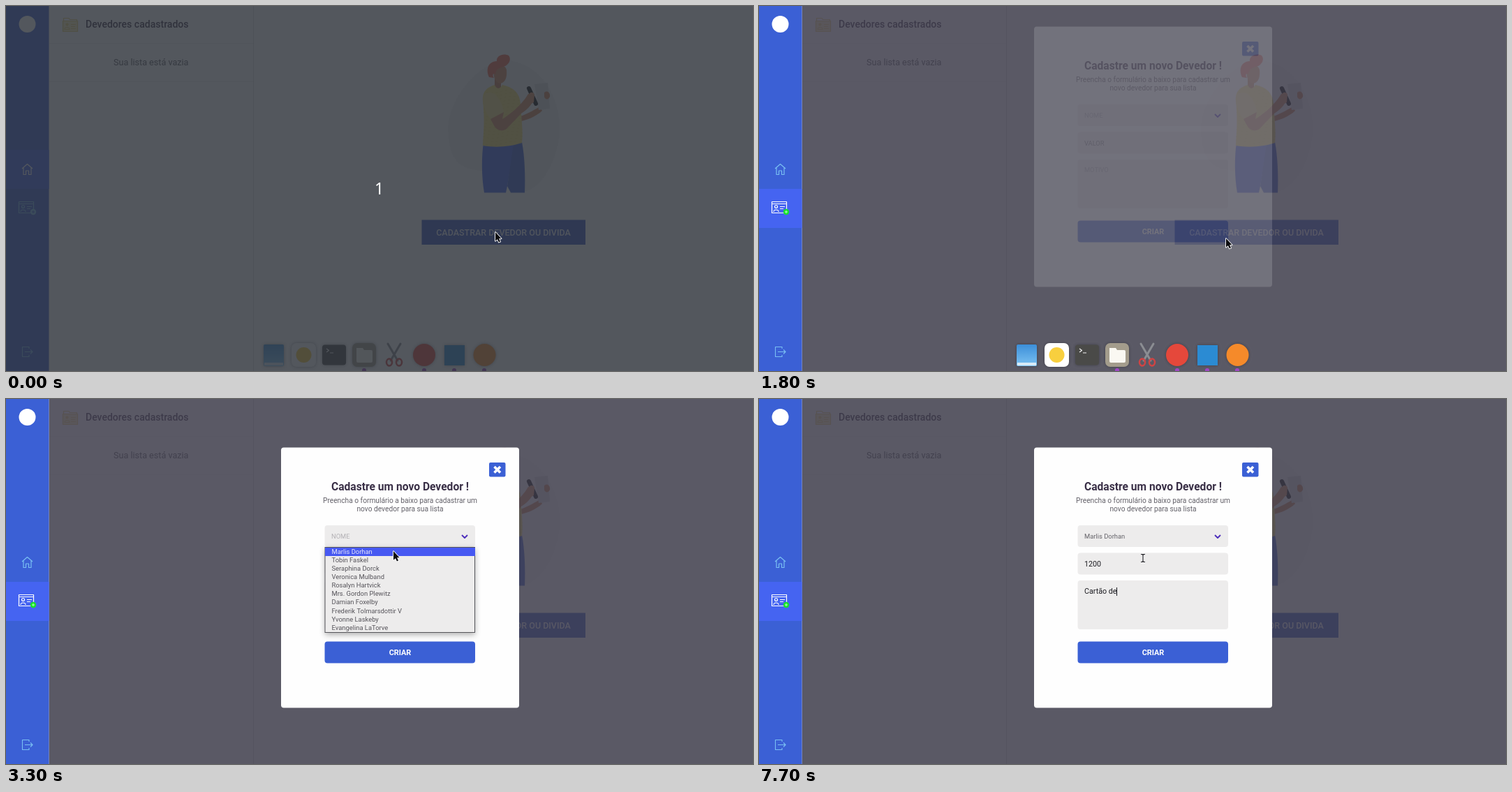
Write an HTML page with a canvas that moves like this. It is 1070 px wide and 523 px high and loops after 8 s.

```html
<!DOCTYPE html>
<html lang="pt-BR">
<head>
<meta charset="utf-8">
<title>Devedores cadastrados</title>
<style>
html, body { margin: 0; width: 100%; height: 100%; overflow: hidden; background: #fefefe; }
canvas { display: block; }
</style>
</head>
<body>
<canvas id="stage" width="1070" height="523"></canvas>
<script>
const W = 1070, H = 523, LOOP = 8000, STEP = 100;
const BLUE = '#3b60d5', ACTIVE = '#4564f1', SKY = '#79bff2';
const NAMES = ['Marlis Dorhan', 'Tobin Faskel', 'Seraphina Dorck', 'Veronica Mulband',
  'Rosalyn Hartvick', 'Mrs. Gordon Plewitz', 'Damian Foxelby', 'Frederik Tolmarsdottir V',
  'Yvonne Laskeby', 'Evangelina LaTorve'];

const stage = document.getElementById('stage').getContext('2d');
const layer = Object.assign(document.createElement('canvas'), { width: W, height: H });
const layerCtx = layer.getContext('2d');
let ctx = stage;

// pointer path: time, x, y
const PATH = [[0, 701, 325], [800, 701, 325], [1000, 498, 247], [1100, 498, 247],
  [1500, 660, 340], [1600, 671, 334], [1700, 671, 334], [1800, 669, 334], [2100, 595, 280],
  [2600, 557, 215], [3100, 553, 202], [3200, 553, 202], [3300, 555, 219], [3600, 552, 222],
  [4000, 550, 228]];
const AMOUNT = [[4900, '1'], [5100, '12'], [5200, '120'], [5400, '1200']];
const REASON = [[6200, 'C'], [6600, 'Ca'], [6700, 'Car'], [6900, 'Cart'], [7200, 'Cartã'],
  [7300, 'Cartão'], [7400, 'Cartão '], [7700, 'Cartão de']];

const typed = (keys, t) => keys.reduce((s, [at, v]) => t >= at ? v : s, '');

function rect(x, y, w, h, color, r = 0) {
  ctx.fillStyle = color;
  ctx.beginPath();
  ctx.roundRect(x, y, w, h, r);
  ctx.fill();
}

function disc(x, y, r, color) {
  ctx.fillStyle = color;
  ctx.beginPath();
  ctx.arc(x, y, r, 0, 7);
  ctx.fill();
}

function shape(d, color) {
  ctx.fillStyle = color;
  ctx.fill(new Path2D(d));
}

function line(d, color, width = 1, cap = 'butt') {
  ctx.strokeStyle = color;
  ctx.lineWidth = width;
  ctx.lineCap = cap;
  ctx.lineJoin = 'round';
  ctx.stroke(new Path2D(d));
}

// cy is the middle of the capitals
function text(s, x, cy, size, color, weight = 400, align = 'left', family = 'Roboto') {
  ctx.font = `${weight} ${size}px ${family}, sans-serif`;
  ctx.fillStyle = color;
  ctx.textAlign = align;
  ctx.fillText(s, x, cy + size * 0.355);
  return ctx.measureText(s).width;
}

// CSS "ease"
function ease(x) {
  if (x <= 0 || x >= 1) return x <= 0 ? 0 : 1;
  const bez = (s, a, b) => 3 * (1 - s) ** 2 * s * a + 3 * (1 - s) * s * s * b + s ** 3;
  let lo = 0, hi = 1;
  for (let i = 0; i < 20; i++) {
    const mid = (lo + hi) / 2;
    if (bez(mid, 0.25, 0.25) < x) lo = mid; else hi = mid;
  }
  return bez(lo, 0.1, 1);
}

function pointerAt(t) {
  const i = PATH.findIndex(k => k[0] > t);
  if (i < 0) return PATH[PATH.length - 1].slice(1);
  const [t0, x0, y0] = PATH[i - 1], [t1, x1, y1] = PATH[i];
  const p = (t - t0) / (t1 - t0);
  return [x0 + (x1 - x0) * p, y0 + (y1 - y0) * p];
}

function sidebar(adding) {
  rect(0, 0, 61.5, H, BLUE);
  rect(0, adding ? 262 : 206, 61.5, 56, ACTIVE);
  disc(30.5, 26, 12, '#fff');
  line('M23 233L30.500 226.500L38 233M25 232V241.500H28.500V236H32.500V241.500H36V232',
    adding ? SKY : '#fff', 1.2);
  const c = adding ? '#fff' : SKY;
  line('M18.500 280.500H39.500V296.500H18.500ZM18.500 283.500H39.500M30 287.500H37M30 290.500H35M21 295C21 291 28 291 28 295', c, 1.2);
  line('M26.500 287.500A2 2 0 1 1 22.500 287.500A2 2 0 1 1 26.500 287.500', c, 1.2);
  disc(39, 295, 4.2, adding ? '#19e32c' : SKY);
  line('M37 295H41M39 293V297', adding ? '#b6ffb9' : BLUE, 1);
  line('M33 491V488.500H23.500V502.500H33V500M27 495.500H38M35 492.500L38 495.500L35 498.500', SKY, 1.1);
}

function shirt() {
  const body = 'M683 200C684 180 686 165 683 135C682 122 690 116 700 113C703 120 708 119 711 113C727 116 736 125 737 140C738 160 741 180 739 196C722 202 700 203 683 200Z';
  shape(body, '#f5df6e');
  ctx.save();
  ctx.clip(new Path2D(body));
  ctx.setLineDash([3, 4]);
  for (let y = 122; y < 200; y += 5) {
    ctx.lineDashOffset = y * 3;
    line(`M683 ${y}Q697 ${y + 5} 711 ${y}T740 ${y}`, '#ead25f', 0.9);
  }
  ctx.restore();
  shape('M683 136C681 126 691 121 700 126C707 132 712 142 713 152L694 162C688 154 684 146 683 136Z', '#f4e183');
}

function person() {
  shape('M633 178C634 130 680 78 718 78C765 82 795 130 793 180C790 225 765 262 742 266L690 238C660 232 636 235 633 178Z', '#f6f6f7');
  shape('M737 158C750 153 758 148 765 144L768 150C760 158 745 164 737 165Z', '#d3875a');
  shape('M757 112L776 110L779 147L763 149Z', '#dcdcde');
  shape('M684 196H729L718 258L716 267.500H685C681 245 681 215 684 196Z', ACTIVE);
  shape('M727 197L739 195C743 215 744 245 743 267.500H723L718 258Z', '#3d61d3');
  shape('M700 103H709V120C706 122 702 120 700 117Z', '#c97d52');
  shirt();
  shape('M694 162L713 152L711 162C722 155 738 143 748 126L756 128C757 138 748 148 738 154L717 176C712 180 704 179 700 173Z', '#d88b5d');
  line('M749 118L759 140', '#0b0b0d', 6, 'round');
  shape('M747 129C750 123 755 122 757 127L756 138L749 142Z', '#d88b5d');
  shape('M771 124C775 120 780 124 779 130C777 135 772 134 771 130Z', '#d3875a');
  shape('M699 88C704 82 716 84 717 92C718 102 715 110 708 111C701 110 697 102 699 88Z', '#d88b5d');
  shape('M692 102C687 91 690 80 703 79C702 71 713 67 720 71C725 77 719 86 712 87C707 88 701 91 701 98C698 95 696 99 699 103Z', '#f2674f');
}

function home(hover) {
  rect(0, 0, W, H, '#fefefe');
  rect(354, 0, 1, H, '#dcdcde');
  rect(62, 53, 292, 1, '#f0f0f1');
  rect(62, 108, 292, 1, '#f0f0f1');
  rect(81, 21, 22, 16, '#f8edb5', 1);
  line('M81.500 21.500H102.500V36.500H81.500ZM82.500 21V17.500H90L91.500 19.500H101.500V21M93 26.500H100M93 29.500H99M93 32.500H100M84 33.500C84 29.500 91 29.500 91 33.500Z', '#e9d377', 1.2);
  disc(87.5, 26.5, 2, '#e9d377');
  text('Devedores cadastrados', 114, 26.5, 14, '#3c3047', 500);
  text('Sua lista está vazia', 154, 81, 12.6, '#5d5b62');
  person();
  rect(595.5, 306.5, 234.5, 35.5, hover ? '#3755c1' : BLUE);
  text('CADASTRAR DEVEDOR OU DIVIDA', 712.5, 324.5, 12.5, '#eef1fc', 500, 'center');
}

function dock(drop) {
  ctx.save();
  ctx.translate(0, drop);
  ctx.shadowColor = 'rgba(30,30,40,.45)';
  ctx.shadowBlur = 4;
  const sky = ctx.createLinearGradient(0, 485, 0, 516);
  sky.addColorStop(0, '#3c8fd9');
  sky.addColorStop(1, '#7cc2f2');
  rect(369, 485, 29, 31, sky, 2);
  rect(409, 483, 35, 34, '#fff', 7);
  rect(453, 485.5, 34, 29, '#4a4a48', 4);
  rect(496, 483, 34, 34, '#a39c8c', 7);
  disc(599, 500, 16, '#e5483b');
  rect(628, 486, 29, 29, '#2b8bd3');
  disc(685.5, 500, 16, '#f58a2a');
  ctx.shadowBlur = 0;
  rect(370, 511, 27, 4, '#d8ebf8');
  disc(426.5, 500, 11, '#f8cf3e');
  line('M459 491L462.500 493.500L459 496M464 497H469', '#f2f2f2', 1.2);
  shape('M502 490H511L513 493H523Q525 493 525 495V509Q525 511 523 511H504Q502 511 502 509Z', '#faf8f2');
  line('M547 484L561 508M565 484L551 508', '#8b8d92', 3, 'round');
  line('M553 510A4 5 0 1 1 545 511A4 5 0 1 1 553 510M567 511A4 5 0 1 1 559 510A4 5 0 1 1 567 511', '#d04444', 2.5);
  for (const x of [513, 599, 642, 685]) disc(x, 522, 3, '#a046c4');
  ctx.restore();
}

function caret(x, cy) {
  rect(Math.round(x), cy - 6, 1, 12, '#16161c');
}

function form(t) {
  const amount = typed(AMOUNT, t), reason = typed(REASON, t);
  rect(394, 69.5, 341, 373, '#fefefe', 4);
  rect(692, 91, 23.5, 20.5, BLUE, 2);
  line('M699.500 97L708 105.500M708 97L699.500 105.500', '#fff', 3.6);
  text('Cadastre um novo Devedor !', 564.5, 125, 15.6, '#3a3047', 700, 'center');
  text('Preencha o formulário a baixo para cadastrar um', 564.5, 145.5, 10.2, '#626068', 400, 'center');
  text('novo devedor para sua lista', 564.5, 157.5, 10.2, '#626068', 400, 'center');

  const field = '#edecec';
  rect(456.5, 181, 215.5, 31, field, 4);
  rect(456.5, 220.5, 215.5, 31, field, 4);
  rect(456.5, 260, 215.5, 70, field, 4);
  if (t < 3600) text('NOME', 466, 197, 9.3, '#b3b1b5');
  else text(NAMES[0], 466, 197, 9.4, '#66646a');
  line('M653 195L657 199L661 195', '#4a2bbb', 1.8);

  const ink = '#1b1b20';
  let w = amount ? text(amount, 466, 236.5, 10.7, ink) : 0;
  if (!amount) text('VALOR', 466, 236.5, 9.3, '#7d7b80');
  if ((t >= 4000 && t < 4500) || (t >= 4900 && t < 5800)) caret(466 + w, 236.5);
  w = reason ? text(reason, 466, 275.5, 10.7, ink) : 0;
  if (!reason) text('MOTIVO', 466, 275, 9.3, '#b3b1b5');
  if (t >= 5800) caret(466 + w, 276);

  rect(456.5, 347.5, 215.5, 31, BLUE, 4);
  text('CRIAR', 564.5, 363, 10.9, '#fff', 700, 'center');
}

// drawn on its own layer so that it fades as one piece
function modal(t) {
  const p = ease((t - 1738) / 470);
  layerCtx.clearRect(0, 0, W, H);
  ctx = layerCtx;
  form(t);
  ctx = stage;
  ctx.globalAlpha = p;
  ctx.drawImage(layer, 0, Math.round(-47 * (1 - p)));
  ctx.globalAlpha = 1;
}

function list() {
  ctx.save();
  ctx.shadowColor = 'rgba(0,0,0,.3)';
  ctx.shadowBlur = 8;
  ctx.shadowOffsetY = 3;
  rect(456.5, 212, 215.5, 123, '#55555a');
  ctx.restore();
  rect(457.5, 213, 213.5, 121, '#edecec');
  rect(457, 213, 215, 12, '#4759f2');
  NAMES.forEach((name, i) =>
    text(name, 466.5, 218.5 + 12.1 * i, 9.4, i ? '#56545a' : '#e6e7fb'));
}

function pointer(x, y, kind) {
  ctx.save();
  ctx.translate(x, y);
  if (kind === 'beam') {
    const d = 'M-3 -5.500H-1L0 -4.500L1 -5.500H3M0 -4.500V4.500M-3 5.500H-1L0 4.500L1 5.500H3';
    line(d, '#fff', 2.4);
    line(d, '#15151a', 1.1);
  } else {
    const d = kind === 'hand'
      ? 'M-2 0Q0 -2 1 0V4L5 5L7 6.500V10L5 13H-2L-6 8.500Q-6 6.500 -4 7L-2 8Z'
      : 'M0 -1V13L3.200 10.200L5.500 15L7.800 14L5.600 9.300H9.500Z';
    ctx.scale(0.9, 0.9);
    line(d, '#fff', 2);
    shape(d, '#0c0c10');
  }
  ctx.restore();
}

function draw(now) {
  const t = Math.floor((now % LOOP) / STEP) * STEP;
  const [x, y] = pointerAt(t);
  const adding = t >= 1800;
  const hover = adding || (x >= 595 && x <= 830 && y >= 306 && y <= 342);

  home(hover);
  if (adding) {
    rect(61.5, 0, W - 61.5, H, 'rgba(62,61,75,.85)');
    modal(t);
  }
  sidebar(adding);
  if (t < 3100) dock(Math.max(0, (t - 2600) / 500) * 45);
  if (t >= 3300 && t < 3600) list();
  if (t < 100) {
    rect(0, 0, W, H, 'rgba(46,50,58,.82)');
    text('1', 534.5, 262, 23, '#fff', 400, 'center', '"Noto Sans"');
  }

  let kind = 'arrow';
  if (t >= 700 && !adding && hover) kind = 'hand';
  if ((t >= 1900 && t < 2400) || t >= 3800) kind = 'beam';
  pointer(x, y, kind);
}

const start = performance.now();
function tick() {
  draw(performance.now() - start);
  requestAnimationFrame(tick);
}
tick();
</script>
</body>
</html>
```
